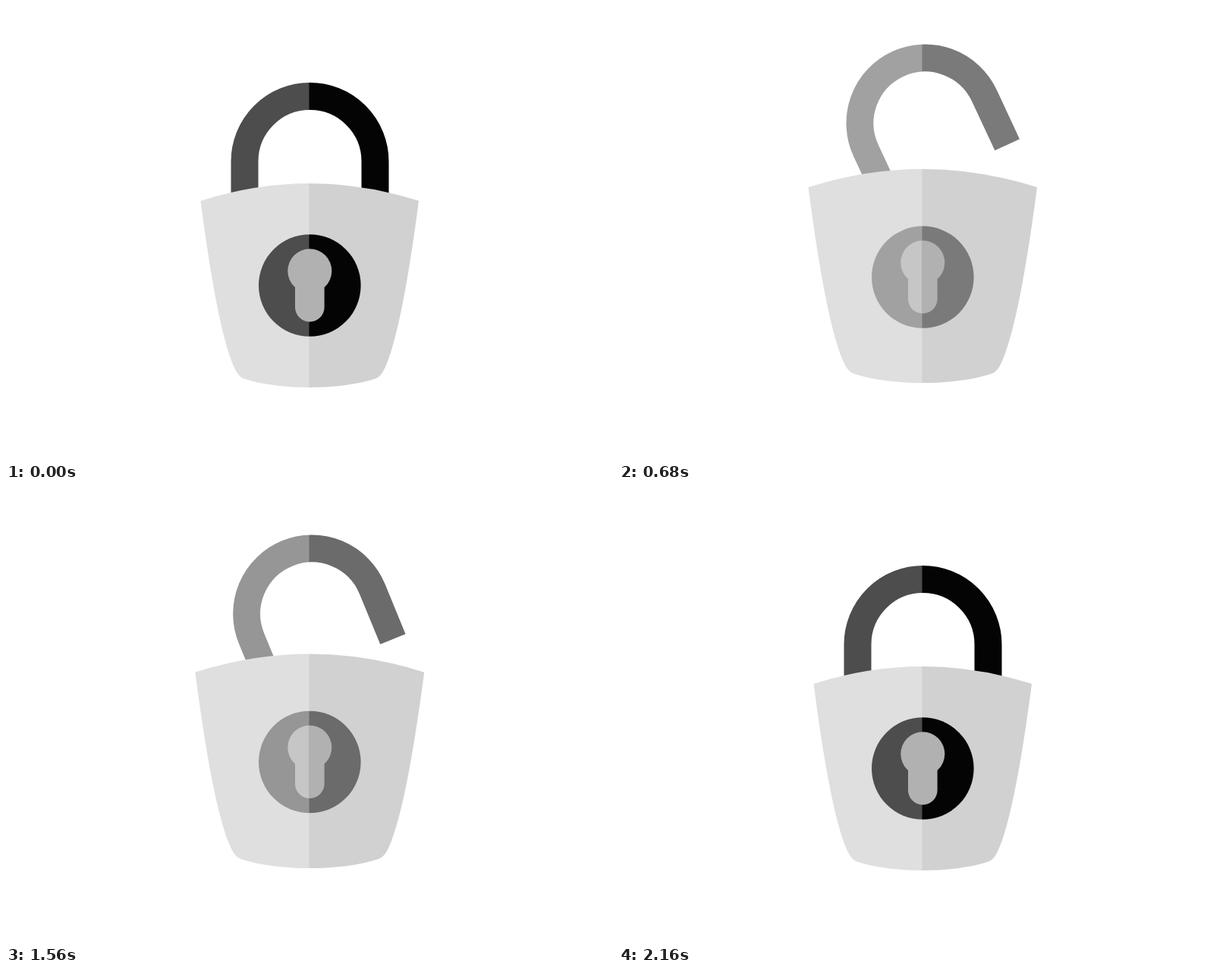
An HTML page for the animation above (2320 ms loop, 800 by 600 pixels).

```html
<!DOCTYPE html>
<html lang="en">
<head>
<meta charset="utf-8">
<title>Padlock</title>
<style>
  html, body { margin: 0; width: 100%; height: 100%; overflow: hidden; background: #fff; }
  svg { display: block; width: 100%; height: 100%; }
</style>
</head>
<body>
<svg viewBox="0 0 800 600">
  <defs>
    <linearGradient id="split" gradientUnits="userSpaceOnUse" x1="0" y1="0" x2="799" y2="0">
      <stop id="lit" offset=".5" stop-color="#c6c6c6"/>
      <stop offset=".5" stop-color="#b1b1b1"/>
    </linearGradient>
  </defs>
  <path id="shackle" d="M-86 71.5V0A86 86 0 0 1 86 0V71.5" fill="none" stroke-width="36"/>
  <path id="body" fill="#d1d1d1" d="M256.5 257Q400.3 211 544 257
    C532.5 345 516.5 444 497.5 481Q492.5 490 486.5 491.5C460.5 500 428.5 503 400.3 503
    C372 503 340 500 314 491.5Q308 490 303 481C284 444 268 345 256.5 257Z"/>
  <circle id="plate" cx="400.3" cy="368.5" r="67.3"/>
  <rect width="399.5" height="600" fill="#fff" opacity=".29"/>
  <g id="hole" fill="url(#split)">
    <circle cx="400.3" cy="349.3" r="29"/>
    <rect x="381" y="350" width="38.6" height="66.5" rx="19.3"/>
  </g>
</svg>
<script>
const LOOP = 2320, STEP = 40, MID = { x: 400.3, y: 368.5 };
const $ = id => document.getElementById(id);

// x, y, angle: shackle; drop, scale: body; key: keyhole drop; open: colour mix
const shut    = { x: 400.5, y: 205,   angle: 0,   drop: 0,     scale: 1,    key: 0,     open: 0 };
const pressed = { x: 400.5, y: 252,   angle: 0,   drop: 16,    scale: 1.05, key: 14.5,  open: 0 };
const raised  = { x: 403.5, y: 154.2, angle: -25, drop: -12.8, scale: 1.05, key: -11.2, open: 1 };
const ajar    = { x: 403.5, y: 168.5, angle: -25, drop: 0,     scale: 1,    key: 0,     open: 1 };

const steps = [
  [0, shut], [320, pressed], [640, raised], [960, ajar],
  [1160, ajar], [1480, raised], [1800, pressed], [2120, shut], [LOOP, shut]
];

// cubic-bezier(.5, 0, .5, 1)
function ease(u) {
  let lo = 0, hi = 1;
  for (let i = 0; i < 24; i++) {
    const s = (lo + hi) / 2;
    if (1.5 * s * (1 - s) + s * s * s < u) lo = s; else hi = s;
  }
  return lo * lo * (3 - 2 * lo);
}

function poseAt(t) {
  const i = steps.findIndex(s => s[0] > t);
  const [t0, a] = steps[i - 1], [t1, b] = steps[i];
  const u = (t - t0) / (t1 - t0), p = ease(u), pose = {};
  for (const k in a) pose[k] = a[k] + (b[k] - a[k]) * (k === 'open' ? u : p);
  return pose;
}

// mix from black to grey in linear light
const toLinear = v => v <= 0.04045 ? v / 12.92 : ((v + 0.055) / 1.055) ** 2.4;
const toScreen = v => v <= 0.0031308 ? v * 12.92 : 1.055 * v ** (1 / 2.4) - 0.055;
const DARK = toLinear(4 / 255), GREY = toLinear(122 / 255);

function metal(mix) {
  const v = Math.round(255 * toScreen(DARK + (GREY - DARK) * mix));
  return `rgb(${v},${v},${v})`;
}

function draw(t) {
  const p = poseAt(t), color = metal(p.open);
  $('shackle').setAttribute('transform', `translate(${p.x} ${p.y}) rotate(${p.angle})`);
  $('shackle').setAttribute('stroke', color);
  $('body').setAttribute('transform',
    `translate(${MID.x} ${MID.y + p.drop}) scale(${p.scale}) translate(${-MID.x} ${-MID.y})`);
  $('plate').setAttribute('transform', `translate(0 ${p.key})`);
  $('plate').setAttribute('fill', color);
  $('hole').setAttribute('transform', `translate(0 ${p.key})`);
  // the keyhole is flat while the lock rests shut
  const resting = t < STEP || t >= 2160;
  $('lit').setAttribute('stop-color', resting ? '#b1b1b1' : '#c6c6c6');
}

let start;
function tick(now) {
  start ??= now;
  const t = Math.max(0, now - start) % LOOP;
  draw(Math.floor(t / STEP) * STEP);
  requestAnimationFrame(tick);
}
draw(0);
requestAnimationFrame(tick);
</script>
</body>
</html>
```
